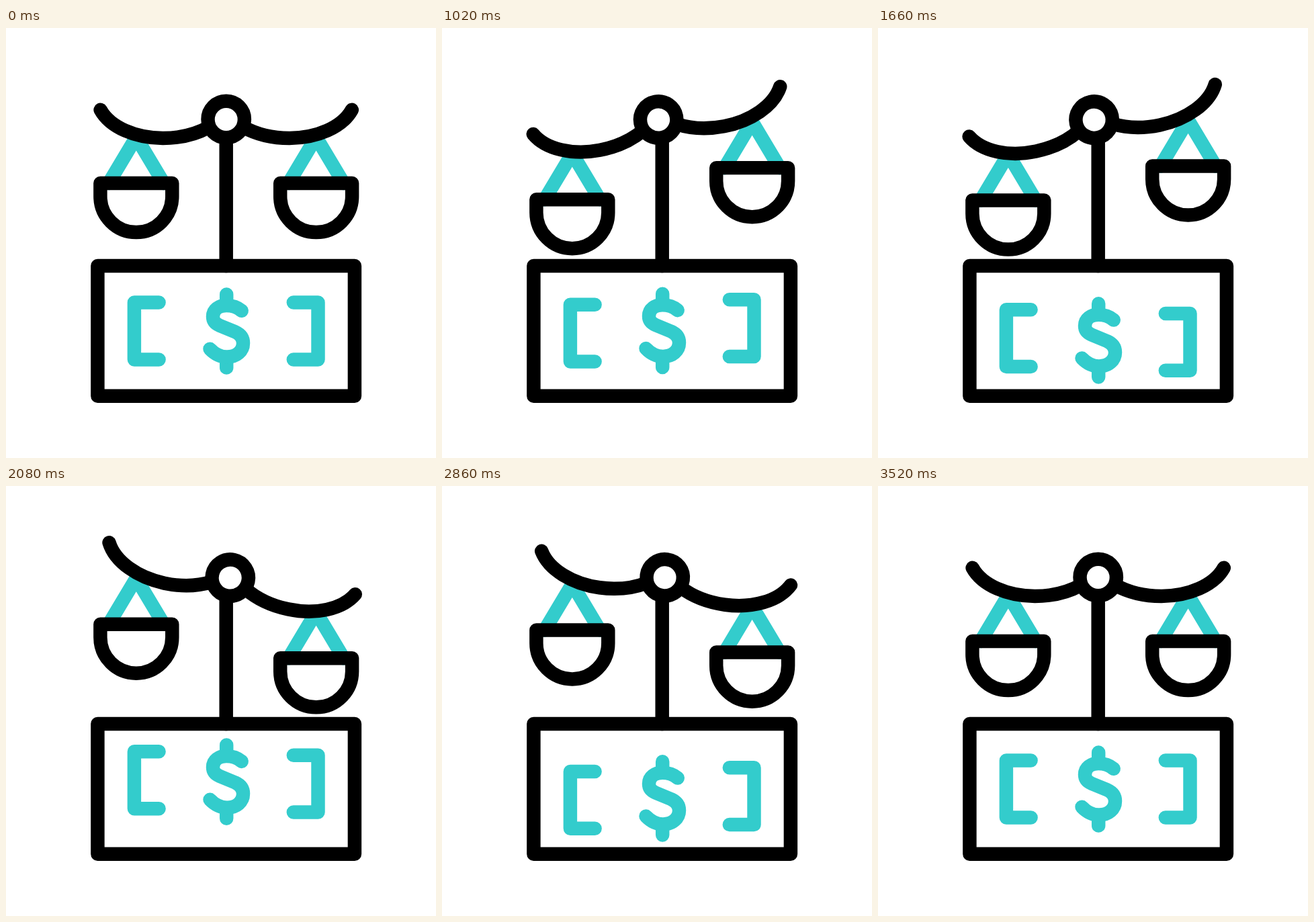
These frames come from a looping animation (640x640 px, 3620 ms). An HTML page:

```html
<!DOCTYPE html>
<html lang="en">
<head>
<meta charset="utf-8">
<title>Scales</title>
<style>
  html, body { margin: 0; width: 100%; height: 100%; overflow: hidden; background: #fff; }
  svg { display: block; width: 100vw; height: 100vh; }
  g, path { fill: none; stroke-width: 20.48; stroke-linecap: round; stroke-linejoin: round; }
  .ink { stroke: #000; }
  .teal { stroke: #33cccc; }
</style>
</head>
<body>
<svg viewBox="0 0 640 640">
  <defs>
    <g id="strings"><path d="M152.8 231L193.8 162.5L234.8 231"/></g>
    <g id="pan"><path d="M140.4 231H247.3V250.6A53.45 53.45 0 0 1 140.4 250.6Z"/></g>
    <path id="arm" d="M140.6 121.8C155 148 193 164 233.5 164C259 164 284 157.5 302 147.5"/>
    <path id="bracket" d="M227.6 408.6H190.9V493.4H227.6"/>
  </defs>

  <g class="teal">
    <use href="#strings" class="left"/>
    <use href="#strings" x="267.8" class="right"/>
  </g>
  <g class="ink">
    <path d="M136.4 353.9H518.9V547.8H136.4Z"/>
    <path d="M327.7 168V354"/>
    <use href="#pan" class="left"/>
    <use href="#pan" x="267.8" class="right"/>
    <g id="beam">
      <use href="#arm"/>
      <use href="#arm" transform="matrix(-1 0 0 1 655.4 0)"/>
      <circle cx="327.7" cy="136" r="27.2" fill="#fff"/>
    </g>
  </g>
  <g class="teal">
    <g class="token"><use href="#bracket"/></g>
    <g class="token">
      <path d="M328.2 396.5V410M328.2 492V505.6"/>
      <path d="M350.7 420.8C345 416 337 413 328 413C317 413 308 419 308 429.5C308 436 311.5 440 318 442.8L341 452.3C348 455.5 353 461 353 469C353 481 343 489.6 329 489.6C318 489.6 309.5 484 303.5 477.7"/>
    </g>
    <g class="token"><use href="#bracket" transform="matrix(-1 0 0 1 655.4 0)"/></g>
  </g>
</svg>
<script>
  const LOOP = 3620, STEP = 20, UNIT = 1.28, STAGGER = 60;
  const all = selector => document.querySelectorAll(selector);
  const beam = document.getElementById('beam');

  // Eased value at time t for matching lists of key times and values
  function tween(t, times, values) {
    if (t <= times[0]) return values[0];
    const i = times.findIndex(time => time > t);
    if (i < 0) return values[values.length - 1];
    const p = (t - times[i - 1]) / (times[i] - times[i - 1]);
    return values[i - 1] + (values[i] - values[i - 1]) * p * p * (3 - 2 * p);
  }

  const swingTimes = [400, 900, 1230, 1650, 2100, 2380, 2660, 3160];
  const tilt = [0, -12, -8.3, -12, 12, 8.3, 12, 0];
  const leftDrop = [0, 20, 16.2, 20, -20, -12.9, -20, 0];
  const rightDrop = [0, -20, -12.9, -20, 20, 16.2, 20, 0];
  const bobTimes = [200, 600, 1400, 2200, 3000, 3400];
  const bob = [0, -12, 15, -12, 15, 0];

  const shift = (node, y) => node.style.transform = `translateY(${y * UNIT}px)`;

  function draw(now) {
    const t = Math.floor(now % LOOP / STEP) * STEP;
    beam.setAttribute('transform', `rotate(${tween(t, swingTimes, tilt)} 327.7 165.3)`);
    all('.left').forEach(node => shift(node, tween(t, swingTimes, leftDrop)));
    all('.right').forEach(node => shift(node, tween(t, swingTimes, rightDrop)));
    all('.token').forEach((node, i) => shift(node, tween(t - i * STAGGER, bobTimes, bob)));
    requestAnimationFrame(() => draw(performance.now() - start));
  }

  const start = performance.now();
  draw(0);
</script>
</body>
</html>
```
